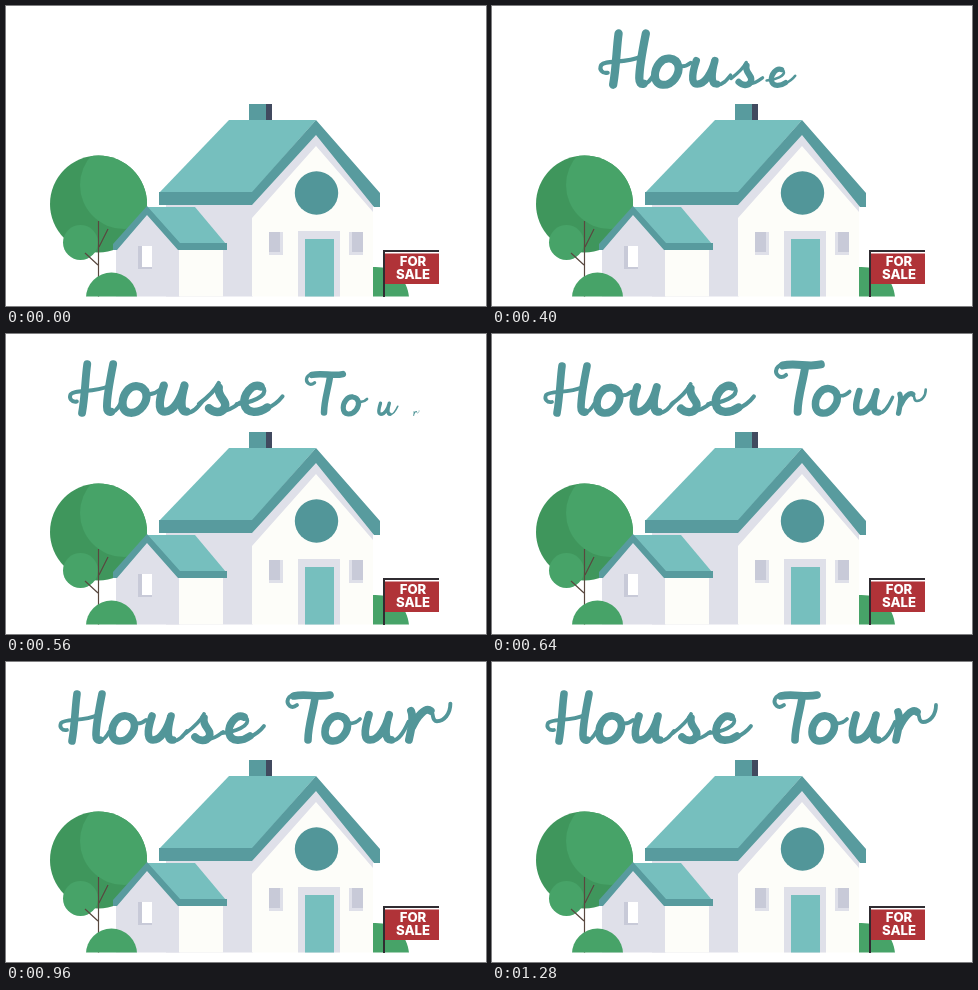
An HTML page for the animation above (3000 ms loop, 480 by 300 pixels).

```html
<!DOCTYPE html>
<html lang="en">
<head>
<meta charset="utf-8">
<title>House Tour</title>
<style>
  html, body { margin: 0; width: 100%; height: 100%; overflow: hidden; background: #fff; }
  svg { display: block; width: 480px; height: 300px; }
  .roof { fill: #76bfbe; }
  .edge { fill: #589b9e; }
  .wall { fill: #fdfdf9; }
  .shade { fill: #dfe0e9; }
  .pane { fill: #c8cad8; }
  .leaf { fill: #47a368; }
  .dark { fill: #3f965c; }
  .twig { fill: none; stroke: #59483f; stroke-width: 1.2; }
  .sign { font: 800 13.2px Inter, "Open Sans", sans-serif; fill: #fff; text-anchor: middle; }
  #title { fill: none; stroke: #529699; stroke-linecap: round; stroke-linejoin: round; }
  .thick { stroke-width: 7.6; }
  .thin { stroke-width: 3.8; }
</style>
</head>
<body>
<svg viewBox="0 0 480 300">
  <defs>
    <clipPath id="crown"><circle cx="92.5" cy="198" r="48.5"/></clipPath>
    <clipPath id="ground"><rect width="480" height="290.5"/></clipPath>
  </defs>

  <g clip-path="url(#ground)">
    <!-- tree -->
    <circle class="dark" cx="92.5" cy="198" r="48.5"/>
    <circle class="leaf" cx="118" cy="179" r="44" clip-path="url(#crown)"/>
    <circle class="leaf" cx="74.5" cy="236.500" r="17.5"/>
    <path class="twig" d="M92.500 215V291M93 241L102 223M92 259L79 247"/>

    <!-- main house -->
    <path fill="#589b9e" d="M243 98H260V115H243Z"/>
    <path fill="#414a5f" d="M260 98H266V115H260Z"/>
    <path class="shade" d="M160 198H247V291H160Z"/>
    <path class="wall" d="M246 199L310 127L367 193V291H246Z"/>
    <path class="shade" d="M246 198L310 126L367 192V206L310 140L246 212Z"/>
    <path class="roof" d="M223 114H310L246 187H153Z"/>
    <path class="edge" d="M153 186H246L310 114L374 187V201H368L310 129L246 199H153Z"/>
    <circle cx="310.500" cy="187" r="21.7" fill="#529699"/>
    <path class="shade" d="M292 225H334V291H292Z"/>
    <path class="roof" d="M299 233H328V291H299Z"/>
    <path class="shade" d="M263 226H277V249H263ZM343 226H357V249H343Z"/>
    <path class="pane" d="M263 226H274V246H263ZM346 226H357V246H346Z"/>

    <!-- annex -->
    <path class="shade" d="M110 241L141 206L174 240V291H110Z"/>
    <path class="wall" d="M173 242H217V291H173Z"/>
    <path class="roof" d="M141 201H189L220 238H173Z"/>
    <path class="edge" d="M141 200L174 237H221V244H172L141 209L111 244H107V238Z"/>
    <path class="pane" d="M132 240H146V263H132Z"/>
    <path fill="#fff" d="M136 240H146V261H136Z"/>

    <!-- bushes -->
    <circle class="leaf" cx="105.500" cy="292" r="25.5"/>
    <path class="leaf" d="M367 261C388 260 401 272 403 291H367Z"/>
  </g>

  <!-- sign -->
  <path fill="#302c31" d="M377 244H433V246H379V291H377Z"/>
  <path fill="#b03338" d="M379 247.500H433V278H379Z"/>
  <text class="sign" x="407" y="260">FOR</text>
  <text class="sign" x="407" y="272.500">SALE</text>

  <g id="title" role="img" aria-label="House Tour"></g>
</svg>

<script>
  const LOOP = 3000, STEP = 40, BASE = 82, SPACE = 20;

  // Each letter: cell start, cell width, turn in the stagger, heavy and light strokes.
  const letters = [
    { x: 53, w: 50, turn: 0,
      thick: 'M72 32C70 46 70 62 67 79M97 32C94 47 91 62 91 73Q91 79 95 78',
      thin: 'M62 68C57 69 54 65 56 61C60 56 78 60 93 53M94 79Q100 78 104 70' },
    { x: 103, w: 37, turn: 1,
      thick: 'M121 54C113 53 107 62 107 70C107 82 120 81 126 73C132 65 130 55 121 54',
      thin: 'M123 55C128 63 135 63 141 58' },
    { x: 140, w: 40, turn: 2,
      thick: 'M147 54C144 63 140 78 148 78C156 78 163 66 166 54C163 65 161 78 168 78',
      thin: 'M168 79C174 79 178 74 182 69' },
    { x: 180, w: 37, turn: 3,
      thick: 'M199 56C197 65 208 68 204 75C201 80 194 79 190 75',
      thin: 'M181 71C189 65 196 58 199 52M203 77C209 77 214 73 218 70' },
    { x: 217, w: 44, turn: 4,
      thick: 'M239 55C231 51 223 63 224 71C226 81 238 79 245 74',
      thin: 'M217 71C230 70 245 64 242 57C241 55 240 54 237 54M243 76C250 73 256 68 259 64' },
    { x: 281, w: 42, turn: 7,
      thick: 'M310 36C308 50 303 64 303 78M289 34C301 31 313 36 325 33',
      thin: 'M292 43C286 48 281 42 283 37Q285 33 291 33' },
    { x: 323, w: 33, turn: 8,
      thick: 'M334 54C326 53 320 62 320 70C320 82 333 81 339 73C345 65 343 55 334 54',
      thin: 'M336 55C341 63 349 63 355 57' },
    { x: 356, w: 47, turn: 9,
      thick: 'M364 53C361 63 357 78 365 78C374 78 381 65 384 53C380 66 379 78 386 78',
      thin: 'M386 79C394 79 399 69 403 60' },
    { x: 403, w: 43, turn: 10,
      thick: 'M406 50C409 57 406 69 404 78M407 66C412 55 420 46 425 50',
      thin: 'M424 49C429 51 425 60 431 60C438 60 444 53 444 43' }
  ];

  // Left end of the line of text: time, x.
  const leftKeys = [[160, 181], [240, 156], [400, 107], [560, 62], [640, 51],
                    [720, 48.5], [800, 50], [960, 52], [1080, 53]];

  const NS = 'http://www.w3.org/2000/svg';
  const title = document.getElementById('title');
  const add = (parent, tag, attrs = {}) => {
    const el = parent.appendChild(document.createElementNS(NS, tag));
    for (const key in attrs) el.setAttribute(key, attrs[key]);
    return el;
  };

  for (const l of letters) {
    l.el = add(title, 'g');
    for (const kind of ['thin', 'thick']) add(l.el, 'path', { class: kind, d: l[kind] });
  }

  function lineLeft(t) {
    if (t <= leftKeys[0][0]) return leftKeys[0][1];
    for (let i = 1; i < leftKeys.length; i++) {
      const [t0, x0] = leftKeys[i - 1], [t1, x1] = leftKeys[i];
      if (t < t1) return x0 + (x1 - x0) * (t - t0) / (t1 - t0);
    }
    return leftKeys[leftKeys.length - 1][1];
  }

  // Ease out with overshoot.
  function pop(age) {
    const q = Math.min(Math.max(age / 500, 0), 1) - 1;
    return 1 + 2.7 * q ** 3 + 1.7 * q ** 2;
  }

  function draw(t) {
    let x = lineLeft(t);
    for (const l of letters) {
      const age = t - 145 - l.turn * 40;
      const s = age > 0 ? pop(age) : 0;
      const cell = l.w * (1 + s) / 2;
      if (l.turn === 7) x += SPACE;
      l.el.setAttribute('visibility', s > 0 ? 'visible' : 'hidden');
      l.el.setAttribute('transform',
        `translate(${x + cell / 2} ${BASE}) scale(${s}) translate(${-l.x - l.w / 2} ${-BASE})`);
      x += cell;
    }
  }

  const start = performance.now();
  function tick() {
    const t = (performance.now() - start) % LOOP;
    draw(Math.floor(t / STEP) * STEP);
    requestAnimationFrame(tick);
  }
  tick();
</script>
</body>
</html>
```
